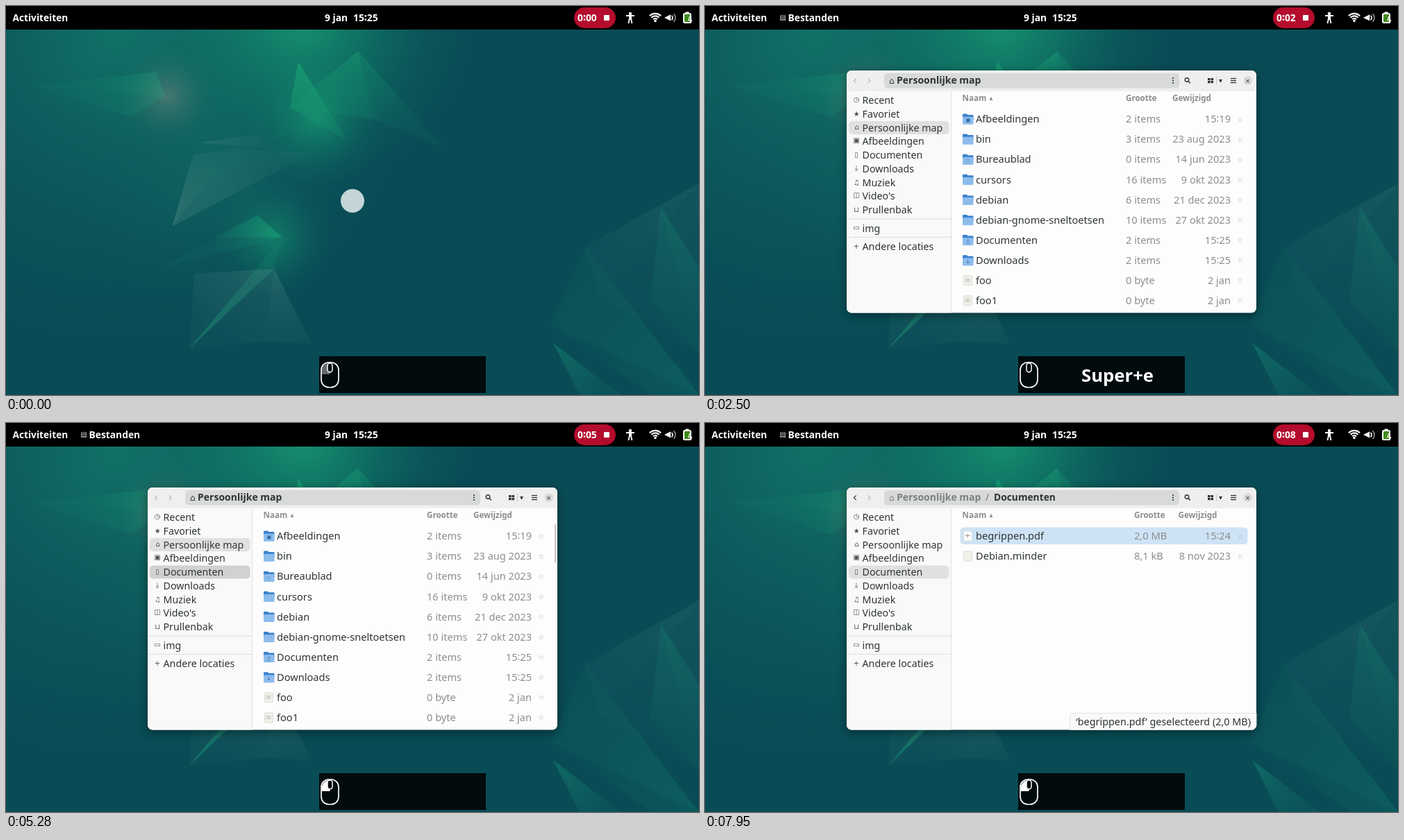
Write an HTML page with a canvas that moves like this. It is 998 px wide and 561 px high and loops after 7990 ms.

```html
<!DOCTYPE html>
<html lang="nl">
<head>
<meta charset="utf-8">
<title>Bestanden</title>
<style>
html, body { margin: 0; width: 100%; height: 100%; overflow: hidden; background: #094c55; }
canvas { display: block; }
</style>
</head>
<body>
<canvas id="stage" width="998" height="561"></canvas>
<script>
const LOOP = 7990, W = 998, H = 561;
const KEY = 1440, OPEN = 1680, PRESS = 5280, RELEASE = 5400, ENTER = 5480, SELECT = 7650;
const INK = '#2e3436', GRAY = '#8b8e8f', DIM = '#b9b9b9', WHITE = '#fff';
let c = document.getElementById('stage').getContext('2d');

const clamp = v => Math.max(0, Math.min(1, v));
const ramp = (t, start, length) => 1 - (1 - clamp((t - start) / length)) ** 3;
const black = a => `rgba(0,0,0,${a})`;

// Text is centred vertically on its capitals.
function text(s, x, y, size, color = INK, weight = 400, align = 'left') {
  c.font = `${weight} ${size}px "Noto Sans", "DejaVu Sans", sans-serif`;
  c.fillStyle = color;
  c.textAlign = align;
  c.fillText(s, x, y + size * 0.357);
}
// A symbol is centred on its visible shape.
function symbol(s, x, y, size = 10, color = INK) {
  c.font = `${size}px "DejaVu Sans", sans-serif`;
  c.fillStyle = color;
  c.textAlign = 'left';
  const m = c.measureText(s);
  c.fillText(s, x + (m.actualBoundingBoxLeft - m.actualBoundingBoxRight) / 2,
    y + (m.actualBoundingBoxAscent - m.actualBoundingBoxDescent) / 2);
}
function box(x, y, w, h, r, fill, stroke, line = 1) {
  c.beginPath();
  c.roundRect(x, y, w, h, r);
  if (fill) { c.fillStyle = fill; c.fill(); }
  if (stroke) { c.strokeStyle = stroke; c.lineWidth = line; c.stroke(); }
}
function disc(x, y, r, fill) {
  box(x - r, y - r, 2 * r, 2 * r, r, fill);
}
function arc(x, y, r, middle, spread, color, line) {
  c.beginPath();
  c.arc(x, y, r, middle - spread, middle + spread);
  c.strokeStyle = color;
  c.lineWidth = line;
  c.stroke();
}
function line(color, width, ...points) {
  c.beginPath();
  points.forEach(([x, y]) => c.lineTo(x, y));
  c.strokeStyle = color;
  c.lineWidth = width;
  c.stroke();
}

function glow(x, y, r, rgb, a) {
  const g = c.createRadialGradient(x, y, 0, x, y, r);
  for (let i = 0; i <= 4; i++) g.addColorStop(i / 4, `rgba(${rgb},${a * (1 - i / 4) ** 1.6})`);
  c.fillStyle = g;
  c.fillRect(0, 0, W, H);
}
// Triangles between one apex and successive rim points, fading away from the apex.
function fan(rgb, a, apex, ...rim) {
  for (let i = 1; i < rim.length; i++) {
    const p = rim[i - 1], q = rim[i];
    const g = c.createLinearGradient(...apex, (p[0] + q[0]) / 2, (p[1] + q[1]) / 2);
    const near = a * (i % 2 ? 1 : 0.65);
    g.addColorStop(0, `rgba(${rgb},${near})`);
    g.addColorStop(1, `rgba(${rgb},${near * 0.25})`);
    c.fillStyle = g;
    c.beginPath();
    for (const v of [apex, p, q]) c.lineTo(...v);
    c.fill();
  }
}
function paintWallpaper() {
  const green = '28,185,125', pale = '105,155,148', teal = '20,125,108';
  c.fillStyle = '#094c56';
  c.fillRect(0, 0, W, H);
  glow(160, 40, 440, teal, 0.75);
  glow(430, 20, 240, green, 0.6);
  glow(447, 165, 95, green, 0.45);
  glow(300, 240, 200, teal, 0.35);
  glow(385, 335, 85, green, 0.4);
  glow(232, 130, 70, '135,140,130', 0.45);
  fan(green, 0.25, [229, 130], [216, 95], [38, 115], [180, 160]);
  fan(green, 0.45, [421, 80], [492, 195], [409, 146]);
  fan(green, 0.3, [507, 65], [409, 146], [528, 163], [630, 204]);
  fan(pale, 0.2, [278, 197], [365, 185], [378, 206]);
  fan(pale, 0.35, [239, 318], [270, 215], [330, 205], [440, 212]);
  fan(teal, 0.5, [398, 334], [225, 377], [362, 302]);
  fan(green, 0.35, [398, 334], [362, 302], [300, 333]);
  fan(green, 0.35, [264, 494], [398, 334], [386, 379]);
  fan(pale, 0.25, [386, 379], [271, 386], [264, 494], [373, 483], [440, 487]);
  fan(pale, 0.15, [998, 256], [834, 347], [855, 420], [998, 500]);
  fan(teal, 0.45, [943, 290], [998, 378], [998, 500], [928, 425]);
  fan(teal, 0.35, [998, 561], [834, 347], [785, 460], [930, 561]);
  fan(teal, 0.6, [788, 486], [885, 561], [826, 561]);
  disc(499, 281, 17, '#c3d5d7');
}

function drawTopBar(t) {
  box(0, 0, W, 34, 0, '#000');
  text('Activiteiten', 9.5, 17, 13.7, WHITE, 700);
  if (t >= KEY) {
    symbol('▤', 112.3, 17, 10, '#ddd');
    text('Bestanden', 119.5, 17, 13.8, WHITE, 700);
  }
  text('9 jan', 459, 17, 13.8, WHITE, 700);
  text('15∶25', 500, 17, 13.8, WHITE, 700);
  box(818, 2, 60, 30, 15, '#b40c2c');
  text('0∶0' + Math.floor((t + 290) / 1000), 823, 17, 13.8, WHITE, 700);
  box(861, 13, 8, 8, 1, WHITE);

  disc(899, 11, 2.2, WHITE);
  line(WHITE, 2, [893, 14], [905, 14]);
  line(WHITE, 4, [899, 13], [899, 20]);
  line(WHITE, 1.8, [896.5, 25], [898, 18], [900, 18], [901.5, 25]);
  for (let r = 4; r < 12; r += 3.6) arc(935, 22, r, -Math.PI / 2, 0.8, WHITE, 2.2);
  disc(935, 21.5, 1.8, WHITE);
  symbol('◀', 953, 17, 12, WHITE);
  arc(956, 17, 4, 0, 0.9, WHITE, 1.8);
  arc(956, 17, 8, 0, 0.8, '#999', 1.6);
  box(976, 11, 10, 13, 1.5, '#3f8a1c', WHITE, 2);
  box(978.5, 8.5, 5, 2, 0, WHITE);
  symbol('ϟ', 985.5, 19.5, 13, WHITE);
}

function drawKeyStrip(t) {
  box(451, 505, 240, 53, 0, 'rgba(0,8,10,.94)');
  const press = t < PRESS ? 0.4 * (1 - clamp(t / 600))
    : t < SELECT ? 1 - clamp((t - RELEASE) / 300) : 1;
  box(455, 515, 11.5, 16, [11, 0, 0, 0], `rgba(255,255,255,${press})`);
  box(454, 514, 25, 36, 11, null, WHITE, 1.7);
  box(463, 515, 7, 13, 3.5, '#02090b', WHITE, 1.5);
  if (t >= KEY && t < 3900) text('Super+e', 594, 532.7, 25.7, WHITE, 700, 'center');
}

const places = [
  ['◷', 'Recent'], ['★', 'Favoriet'], ['⌂', 'Persoonlijke map'], ['▣', 'Afbeeldingen'],
  ['▯', 'Documenten'], ['⤓', 'Downloads'], ['♫', 'Muziek'], ['◫', "Video's"],
  ['⊔', 'Prullenbak'], ['▭', 'img'], ['+', 'Andere locaties']
];
const homeFiles = [
  ['▣', 'Afbeeldingen', '2 items', '15∶19'], ['', 'bin', '3 items', '23 aug 2023'],
  ['∷', 'Bureaublad', '0 items', '14 jun 2023'], ['', 'cursors', '16 items', '9 okt 2023'],
  ['', 'debian', '6 items', '21 dec 2023'], ['', 'debian-gnome-sneltoetsen', '10 items', '27 okt 2023'],
  ['▯', 'Documenten', '2 items', '15∶25'], ['↓', 'Downloads', '2 items', '15∶25'],
  ['≡', 'foo', '0 byte', '2 jan'], ['≡', 'foo1', '0 byte', '2 jan']
];
const documents = [
  ['÷', 'begrippen.pdf', '2,0 MB', '15∶24'], [' ', 'Debian.minder', '8,1 kB', '8 nov 2023']
];

function drawFileIcon(mark, y) {
  if ('≡÷ '.includes(mark) && mark) {
    box(372.5, y - 7, 12, 14, 1, mark === '÷' ? WHITE : '#f1f1ea', '#dcdcd6');
    symbol(mark, 378.5, y, 11, mark === '÷' ? '#777' : DIM);
    return;
  }
  box(371, y - 7.5, 7, 6, 1.2, '#3b82ce');
  box(371, y - 6, 15.5, 8, 1.2, '#3b82ce');
  box(371, y - 3.3, 15.5, 11, 1.2, '#8dbcec');
  if (mark) symbol(mark, 378.8, y + 2.2, 8, '#2a68ad');
}

function drawHeader(inside) {
  const y = 107.5;
  symbol('‹', 216, y, 17, inside ? INK : DIM);
  symbol('›', 236.5, y, 17, DIM);
  box(258, 97, 425, 21.5, 5, '#d8dad8');
  symbol('⌂', 268.5, y, 12, inside ? '#777' : INK);
  text('Persoonlijke map', 276, y, 14, inside ? '#7d8080' : INK, 700);
  if (inside) {
    text('/', 404, y, 14, '#6d7070');
    text('Documenten', 416, y, 13.8, INK, 700);
  }
  for (const side of [-1, 0, 1]) {
    disc(674, y + side * 3.5, 1.1, INK);
    box(757, y + side * 3 - 0.6, 8, 1.3, 0, INK);
  }
  for (let i = 0; i < 4; i++) box(724 + i % 2 * 4.5, 104 + (i >> 1) * 4, 3.6, 3.2, 0, INK);
  arc(694, y - 1, 2.8, 0, Math.PI, INK, 1.4);
  line(INK, 1.5, [696, y + 1], [699, y + 4]);
  box(736, 102, 1, 11, 0, '#c8c8c8');
  symbol('▾', 742.5, y, 10);
  disc(781.8, y, 6.3, '#d9d9d9');
  symbol('×', 781.8, y, 9);
}

function drawSidebar(t) {
  const moved = ramp(t, ENTER, 200);
  const shade = {
    'Persoonlijke map': 0.1 * (1 - moved),
    Muziek: 0.05 * (ramp(t, 3620, 200) - ramp(t, 4050, 200)),
    Downloads: 0.05 * (ramp(t, 4050, 100) - ramp(t, 4110, 140)),
    Documenten: t < PRESS ? 0.06 * ramp(t, 4110, 140) : 0.16 - 0.06 * moved
  };
  places.forEach(([mark, label], i) => {
    const group = Math.max(0, i - 8);
    const y = 136 + 19.75 * i + 6.8 * group;
    if (group) box(204, y - 14, 150, 1, 0, '#dedede');
    if (shade[label]) box(207, y - 9.5, 144.5, 19, 5, black(shade[label]));
    symbol(mark, 218.3, y - 0.5, 10, '#4a4d4f');
    text(label, 226.5, y, 14.25);
  });
}

function drawFiles(t, inside) {
  const [sizeX, dateX] = inside ? [618, 681.5] : [606, 673];
  text('Naam', 370.5, 133, 11.6, GRAY, 700);
  symbol('▴', 412, 133, 10, GRAY);
  text('Grootte', sizeX, 133, 11.6, GRAY, 700);
  text('Gewijzigd', dateX, 133, 11.6, GRAY, 700);
  if (inside) {
    const hover = ramp(t, 6450, 130), chosen = ramp(t, SELECT, 130);
    box(367.5, 150.5, 414, 24.5, 5, black(0.045 * hover * (1 - chosen)));
    box(367.5, 150.5, 414, 24.5, 5, `rgba(206,227,246,${chosen})`);
  } else {
    box(790, 146, 2, 56, 1, black(0.2 * ramp(t, 3220, 200)));
  }
  (inside ? documents : homeFiles).forEach(([mark, name, size, date], i) => {
    const y = 163 + 29.1 * i;
    drawFileIcon(mark, y);
    text(name, 390, y, 14.6);
    text(size, sizeX, y, 14.6, GRAY);
    text(date, 757, y, 14.6, GRAY, 400, 'right');
    symbol('☆', 770.8, y, 10, '#aaa');
  });
  if (t >= SELECT) {
    box(525.5, 418.5, 268.5, 24, [6, 0, 7, 0], '#fafafa', '#e2e2e2');
    text('‘begrippen.pdf’ geselecteerd (2,0 MB)', 786, 431, 14.4, INK, 400, 'right');
  }
}

function drawWindow(t) {
  if (t < OPEN) return;
  const p = clamp((t - OPEN + 20) / 150);
  const grow = p === 1 ? 1 : 1 - 2 ** (-10 * p);
  const inside = t >= ENTER;
  c.save();
  c.globalAlpha = grow;
  c.translate(499, 442);
  c.scale(0.01 + 0.99 * grow, 0.05 + 0.95 * grow);
  c.translate(-499, -442);
  c.shadowColor = black(0.45);
  c.shadowBlur = 14;
  c.shadowOffsetY = 3;
  box(204, 93, 590, 349.5, 7, '#fdfdfd');
  c.shadowColor = 'transparent';
  box(204, 93, 590, 30, [7, 7, 0, 0], '#efefee');
  box(204, 123, 150, 319.5, [0, 0, 0, 7], '#f9f9fa');
  box(354, 123, 1, 319.5, 0, '#e2e2e2');
  drawHeader(inside);
  drawSidebar(t);
  drawFiles(t, inside);
  c.restore();
}

const screen = c;
const wallpaper = document.createElement('canvas');
wallpaper.width = W;
wallpaper.height = H;
c = wallpaper.getContext('2d');
paintWallpaper();
c = screen;

function draw() {
  const t = performance.now() % LOOP;
  c.drawImage(wallpaper, 0, 0);
  drawWindow(t);
  drawTopBar(t);
  drawKeyStrip(t);
  requestAnimationFrame(draw);
}
draw();
</script>
</body>
</html>
```
